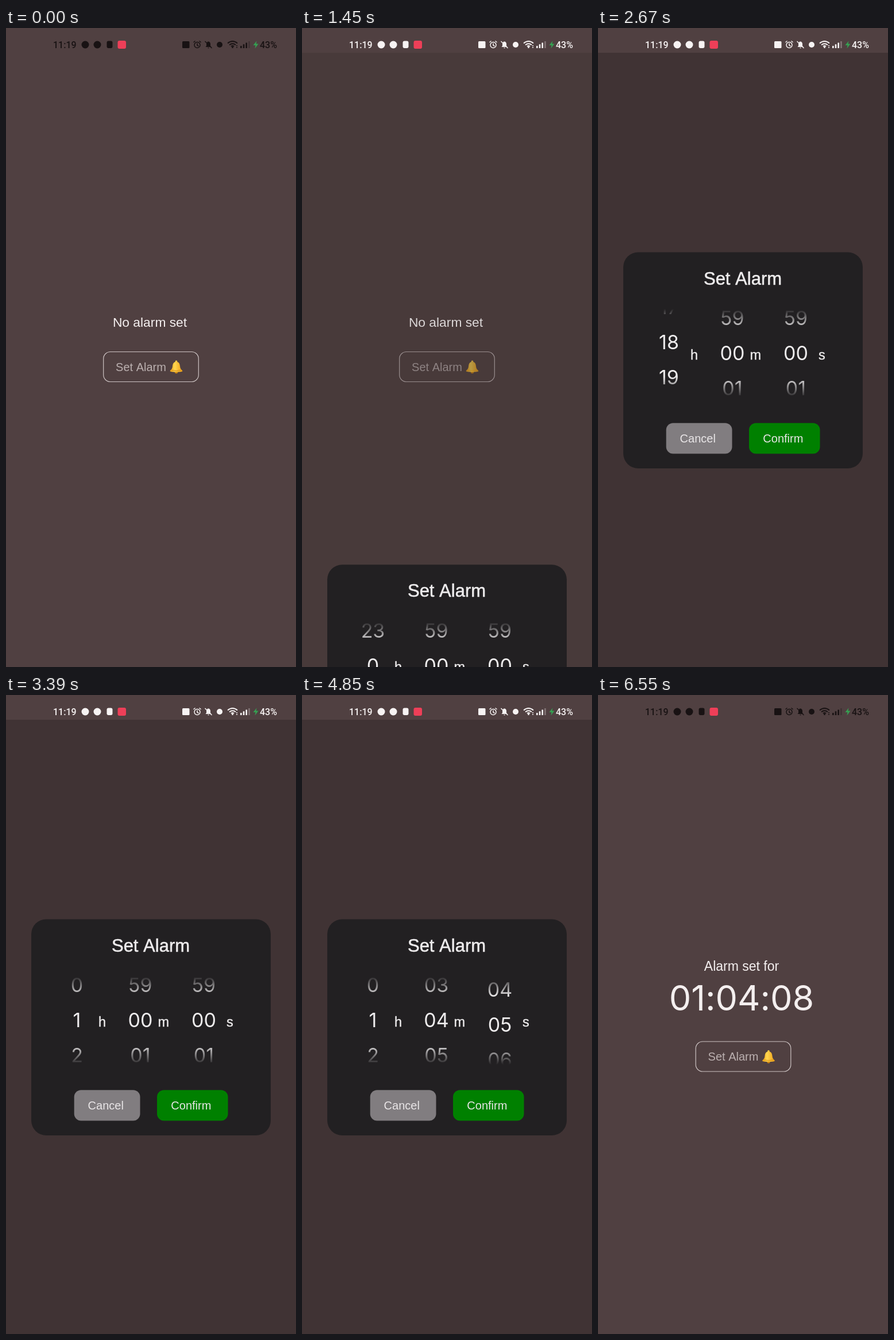
Write an HTML page with a canvas that moves like this. It is 505 px wide and 1110 px high and loops after 6670 ms.

```html
<!DOCTYPE html>
<html lang="en">
<head>
<meta charset="utf-8">
<title>Set Alarm</title>
<style>
  html, body { margin: 0; height: 100%; overflow: hidden; background: #504041; }
  canvas { display: block; }
</style>
</head>
<body>
<canvas id="stage" width="505" height="1110"></canvas>
<script>
const ctx = document.getElementById('stage').getContext('2d');
const LOOP = 6670, ROW = 61;
const SANS = '"Liberation Sans", Arial, sans-serif';
const DIGITS = 'Inter, sans-serif';

// Keeps colons between digits on the baseline.
ctx.textRendering = 'optimizeSpeed';

const clamp = x => Math.min(1, Math.max(0, x));
const span = (t, from, to) => clamp((t - from) / (to - from));
const smooth = x => x * x * (3 - 2 * x);
const easeOut = x => 1 - (1 - x) ** 2;
const flick = (t, from, to, distance) => distance * easeOut(span(t, from, to));

// Opacity of a touchable: dims to 0.2 while held, then recovers.
function touchOpacity(t, down, up) {
  const dim = smooth(span(t, down, down + 150));
  const back = smooth(span(t, up, up + 250));
  return 1 - 0.8 * dim * (1 - back);
}

function text(str, x, y, size, color, { align = 'center', heavy = 0, font = SANS, weight = 400 } = {}) {
  ctx.font = `${weight} ${size}px ${font}`;
  ctx.textAlign = align;
  ctx.fillStyle = ctx.strokeStyle = color;
  ctx.fillText(str, x, y);
  if (heavy) {
    ctx.lineWidth = heavy;
    ctx.lineJoin = 'round';
    ctx.strokeText(str, x, y);
  }
}

function box(x, y, w, h, r, fill) {
  ctx.beginPath();
  ctx.roundRect(x, y, w, h, r);
  if (fill) {
    ctx.fillStyle = fill;
    ctx.fill();
  }
}

function disc(x, y, r, fill) {
  ctx.beginPath();
  ctx.arc(x, y, r, 0, 7);
  ctx.fillStyle = fill;
  ctx.fill();
}

function draw(path, x, y, { fill, stroke, width = 1.5 }) {
  ctx.save();
  ctx.translate(x, y);
  const shape = new Path2D(path);
  if (fill) {
    ctx.fillStyle = fill;
    ctx.fill(shape);
  }
  if (stroke) {
    ctx.strokeStyle = stroke;
    ctx.lineWidth = width;
    ctx.stroke(shape);
  }
  ctx.restore();
}

function statusBar(color) {
  const label = { align: 'left', font: 'Roboto, sans-serif', weight: 500 };
  text('11:19', 82, 35, 16, color, label);
  text('43%', 442, 35, 16, color, label);
  disc(138, 29, 6.5, color);
  disc(159, 29, 6.5, color);
  box(175.5, 22.5, 10, 12.5, 3, color);
  box(194.5, 22, 14.5, 14, 3, '#ee3f58');
  box(307, 23, 12.5, 12, 1.5, color);
  draw('M5 .5A5 5 0 1 1 -5 .5A5 5 0 1 1 5 .5M0 -2.5V1L2.5 2.5M-6.5 -4L-3.5 -6.5M6.5 -4L3.5 -6.5', 333, 29, { stroke: color });
  draw('M-5 4L-3.5 2V-1C-3.5 -7 3.5 -7 3.5 -1V2L5 4ZM-1.5 5H1.5L0 6.5Z', 352.5, 29, { fill: color });
  draw('M-6 -6L6 6', 352.5, 29, { stroke: color });
  disc(372, 29, 5, color);
  draw('M-8.5 -2.5Q0 -9.5 8.5 -2.5M-5.5 .5Q0 -4 5.5 .5M-2.5 3Q0 1 2.5 3', 394.5, 29, { stroke: color, width: 1.8 });
  disc(394.5, 33.5, 1.5, color);
  box(401, 30, 2, 1.5, 0, color);
  box(401, 33, 2, 1.5, 0, color);
  for (let i = 0; i < 4; i++) {
    ctx.globalAlpha = i < 3 ? 1 : 0.3;
    box(408 + i * 4.7, 31 - i * 2.7, 2.6, 4 + i * 2.7, 0.5, color);
  }
  ctx.globalAlpha = 1;
  draw('M1.5 -6.5L-4.5 1H-.5L-1.5 6.5L4.5 -1.5H.5Z', 435, 29, { fill: '#35a052' });
}

function bell(x, y) {
  disc(x, y + 9, 2.8, '#c98413');
  const shine = ctx.createLinearGradient(-9, 0, 9, 0);
  shine.addColorStop(0, '#f2a91c');
  shine.addColorStop(0.35, '#ffd650');
  shine.addColorStop(1, '#f0a51b');
  draw('M-11 7.5C-10 5 -7 5 -6.5 -1C-6 -6 -4 -8 -1.6 -8.5A1.8 1.8 0 1 1 1.6 -8.5C4 -8 6 -6 6.5 -1C7 5 10 5 11 7.5Q10 9 0 9T-11 7.5Z', x, y, { fill: shine });
  draw('M-8.5 5.8Q0 8.2 8.5 5.8', x, y, { stroke: '#d18a16', width: 1 });
}

function homeScreen(t, armed) {
  const x = armed ? 0.5 : 0;
  const y = armed ? 39.5 : 0;
  if (armed) {
    text('Alarm set for', 250, 479, 23, '#f4efef');
    text('01:04:08', 250, 548, 61, '#f4efef', { font: DIGITS });
  } else {
    text('No alarm set', 250.5, 519, 22.8, '#f4efef');
  }
  ctx.globalAlpha = touchOpacity(t, 1150, 1300);
  box(169.7 + x, 562.5 + y, 165.6, 52, 12);
  ctx.strokeStyle = '#cdc3c3';
  ctx.lineWidth = 1.2;
  ctx.stroke();
  text('Set Alarm', 235 + x, 595.5 + y, 20, '#bbb0b0');
  bell(296.5 + x, 588.5 + y);
  ctx.globalAlpha = 1;
}

function wheel(x, value, count, digits) {
  const fade = ctx.createLinearGradient(0, 488, 0, 642);
  const edge = 36 / 154;
  fade.addColorStop(0, 'rgba(238,236,237,0)');
  fade.addColorStop(edge, '#eeeced');
  fade.addColorStop(1 - edge, '#eeeced');
  fade.addColorStop(1, 'rgba(238,236,237,0)');
  for (let n = Math.floor(value) - 1; n <= value + 2; n++) {
    const label = String((n + count) % count).padStart(digits, '0');
    text(label, x, 577 + (n - value) * ROW, 34, fade, { font: DIGITS });
  }
}

function button(label, x, w, color) {
  box(x, 686.3, w, 53.2, 12, color);
  text(label, x + w / 2 - 2.4, 720, 20, '#e9e6e7');
}

function picker(t, entered, opacity) {
  const hours = flick(t, 1900, 2790, 18.65) + flick(t, 2850, 3400, 6.35);
  const minutes = flick(t, 3560, 4060, 3) + flick(t, 4200, 4500, 1);
  const seconds = flick(t, 4600, 4900, 5) + flick(t, 5000, 5350, 3);

  ctx.save();
  ctx.globalAlpha = opacity;
  ctx.translate(0, 1110 * (1 - entered));
  box(44, 389.5, 417, 375.5, 26, '#222022');
  text('Set Alarm', 252, 445.5, 31, '#eeeced', { heavy: 0.6 });
  wheel(123.5, hours, 24, 1);
  wheel(234, minutes, 60, 2);
  wheel(344.5, seconds, 60, 2);
  const unit = { align: 'left', heavy: 0.4 };
  text('h', 161, 575.5, 23.5, '#eeeced', unit);
  text('m', 264.5, 575.5, 23.5, '#eeeced', unit);
  text('s', 384, 575.5, 23.5, '#eeeced', unit);
  button('Cancel', 118.7, 114.8, '#817d80');
  ctx.globalAlpha = opacity * touchOpacity(t, 5540, 5750);
  button('Confirm', 263, 123.5, '#008000');
  ctx.restore();
}

function render(t) {
  const entered = smooth(span(t, 1314, 1584));
  const opacity = 1 - smooth(span(t, 5695, 5995));
  const modalOpen = t >= 1300 && t < 6000;
  ctx.globalAlpha = 1;
  ctx.fillStyle = '#504041';
  ctx.fillRect(0, 0, 505, 1110);
  homeScreen(t, t >= 5690);
  if (modalOpen) {
    ctx.fillStyle = `rgba(0,0,0,${0.2 * entered * opacity})`;
    ctx.fillRect(0, 43, 505, 1067);
    picker(t, entered, opacity);
  }
  statusBar(modalOpen ? '#f7f3f3' : '#181213');
}

function frame() {
  render(performance.now() % LOOP);
  requestAnimationFrame(frame);
}
frame();
</script>
</body>
</html>
```
